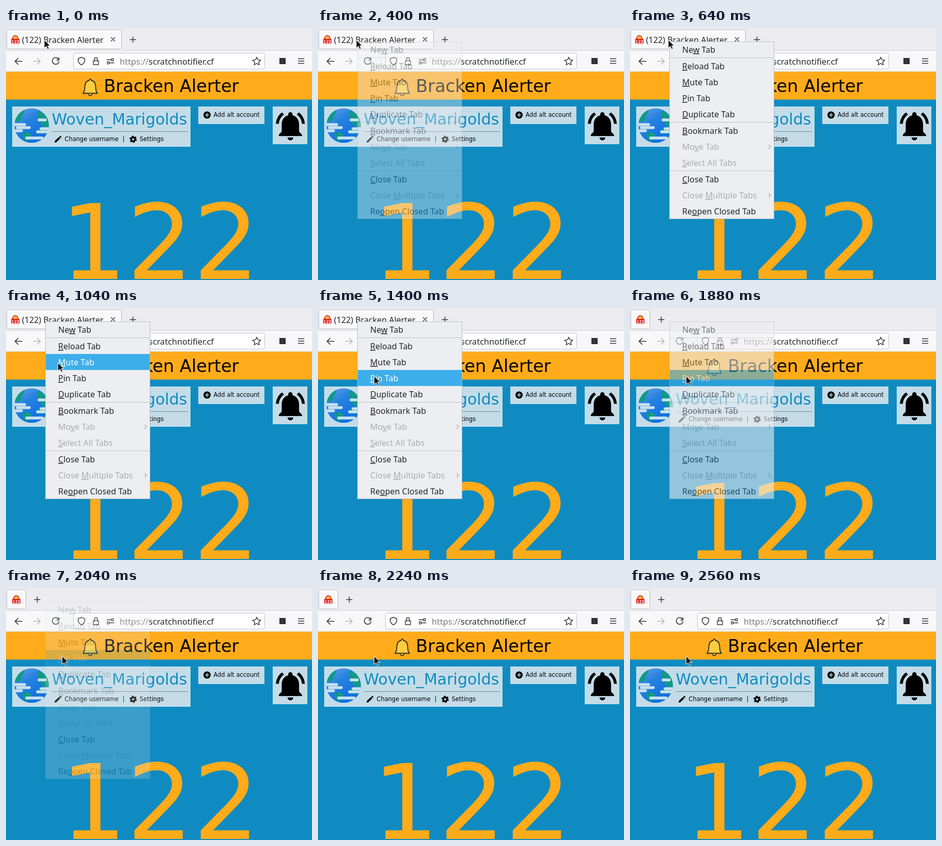
An HTML page for the animation above (2.92 s loop, 592 by 488 pixels).

```html
<!DOCTYPE html>
<html lang="en">
<head>
<meta charset="utf-8">
<title>Pin Tab</title>
<style>
  html, body { margin: 0; width: 100%; height: 100%; overflow: hidden; }
  svg { display: block; }
  text { white-space: pre; }
  .ui { font: 16px "Noto Sans", sans-serif; fill: #232629; }
  .page { font-family: "DejaVu Sans", sans-serif; }
  .small { font-size: 11.4px; }
  .line { fill: none; stroke: #33333a; stroke-width: 1.4; stroke-linecap: round; stroke-linejoin: round; }
  .panel { fill: #c3dce8; }
  .key { text-decoration: underline; }
  .off { fill: #a9abae; }
  .hover rect { fill: #3daee9; }
  .hover text { fill: #fcfcfc; }
</style>
</head>
<body>
<svg width="592" height="488" viewBox="0 0 592 488">
  <defs>
    <clipPath id="disc"><circle cx="49.5" cy="189" r="33.5"/></clipPath>
    <linearGradient id="sea" x2=".6" y2="1">
      <stop stop-color="#5c9fe4"/><stop offset=".45" stop-color="#2580e0"/><stop offset="1" stop-color="#0c6fe0"/>
    </linearGradient>
    <g id="icon">
      <path d="M2 8C3 6 3 1 8 .7 13 1 13 6 14 8Z" fill="#fbc531" stroke="#d01818" stroke-width="1.6"/>
      <rect y="7.5" width="16" height="8.5" rx="1" fill="#e01515"/>
      <text x="8" y="14.7" text-anchor="middle" font-family="DejaVu Sans, sans-serif" font-size="7.5" font-weight="bold" fill="#fff">122</text>
    </g>
  </defs>

  <!-- browser -->
  <rect width="592" height="44" fill="#ededf1"/>
  <rect y="43" width="592" height="42" fill="#f8f8fa"/>
  <path d="M0 43.5H592M0 84.5H592" stroke="#cfcfd5"/>
  <rect id="tab" x="1.5" y="3.5" height="37" rx="4" fill="#f9f9fb" stroke="#b9b9c0"/>
  <use id="favicon" href="#icon" y="14"/>
  <g id="tabLabel">
    <text class="ui" x="31" y="29">(122) Bracken Alerter</text>
    <path class="line" d="M203.5 18.5l7 7m0-7l-7 7"/>
  </g>
  <path id="plus" class="line" d="M-5.5 22.5H5.5M0 17V28"/>

  <g class="line">
    <path d="M31 64.5H18M23.5 58.5L17.5 64.5 23.5 70.5" stroke-width="1.6"/>
    <path d="M53 64.5H66M60.500 58.5L66.5 64.5 60.5 70.5" stroke="#b4b4ba"/>
    <path d="M102 61A6.5 6.5 0 1 0 102.5 65M102.5 57.5V62H98" stroke-width="1.6"/>
    <rect x="130.5" y="48.5" width="370" height="31" rx="3" style="fill:#fff;stroke:#c0c0c7;stroke-width:1"/>
    <path d="M146 57L152.5 59.5C153 66 150 69.5 146 71.5 142 69.5 139 66 139.5 59.5Z"/>
    <path d="M169 63.5H179V71H169ZM171 63V60.5a3 3 0 0 1 6 0V63"/>
    <path d="M195 61.5H203M201 67.5H209"/>
    <circle cx="206" cy="61.5" r="2.2"/><circle cx="198" cy="67.5" r="2.2"/>
    <path d="M485 56.5L487.3 61.6 493 62.2 488.8 66 490 71.5 485 68.7 480 71.5 481.2 66 477 62.2 482.7 61.6Z"/>
    <path d="M565.5 59.5H576.5M565.5 64H576.5M565.5 68.5H576.5"/>
  </g>
  <rect x="529" y="58" width="12" height="12" fill="#33333a"/>
  <text class="ui" x="220" y="70.5" style="font-size:16.3px"><tspan fill="#7c7c82">https://</tspan>scratchnotifier.cf</text>

  <!-- page -->
  <g class="page">
    <rect y="138" width="592" height="350" fill="#0f8bc1"/>
    <rect y="84.6" width="592" height="54" fill="#ffab1a"/>
    <path d="M149 126.5C152 123 152.5 120 152.5 114 152.5 107 156 102.5 161 101.5 160.5 98 165.5 98 165 101.5 170 102.5 173.5 107 173.5 114 173.5 120 174 123 177 126.5Z" fill="#ffcb3f" stroke="#302a20" stroke-width="1.8" stroke-linejoin="round"/>
    <path d="M159.5 127.5a3.5 3.2 0 0 0 7 0" fill="#ffcb3f" stroke="#302a20" stroke-width="1.8"/>
    <text x="189.3" y="124" font-size="33.6">Bracken Alerter</text>

    <rect class="panel" x="12" y="152" width="345" height="78"/>
    <g clip-path="url(#disc)">
      <circle cx="49.5" cy="189" r="33.5" fill="url(#sea)"/>
      <path d="M16 182C20 168 28 160 36 158L34 166 30 172 28 180ZM60 160C70 162 79 170 84 181L82 194 73 191 66 184 62 176ZM30 205L44 201 50 209 46 219 36 217ZM60 196H74L70 206 60 204Z" fill="#119a86"/>
      <path d="M17 187H36M22 193H45M17 199H30M61 201H84M68 195H84M40 213H70M64 178H76" stroke="#c9e2ee" stroke-width="5.5" stroke-linecap="round"/>
    </g>
    <text x="88.5" y="187" font-size="30">
      <tspan fill="#0f8bc1" x="88.5">Woven_Marigolds</tspan></text>
    <path d="M88 200.5H353" stroke="#75878f"/>
    <path transform="translate(92 206.5) scale(.73)" d="M3 17.25V21h3.75L17.81 9.94l-3.75-3.75zM20.71 7.04a1 1 0 0 0 0-1.41l-2.34-2.34a1 1 0 0 0-1.41 0l-1.83 1.83 3.75 3.75z"/>
    <g fill="none" stroke="#000">
      <circle cx="246" cy="215.5" r="3.8" stroke-width="3.4"/>
      <circle cx="246" cy="215.5" r="6" stroke-width="2.2" stroke-dasharray="3.142"/>
    </g>
    <g class="small">
      <text x="113.5" y="219">Change username</text>
      <text x="225.5" y="219">|</text>
      <text x="258.5" y="219">Settings</text>
      <rect class="panel" x="372" y="152" width="128" height="34"/>
      <text x="401.5" y="172">Add alt account</text>
    </g>
    <circle cx="389" cy="168.5" r="7"/>
    <path d="M385 168.5H393M389 164.5V172.5" stroke="#c3dce8" stroke-width="1.6"/>

    <rect class="panel" x="516" y="152" width="67" height="73"/>
    <path transform="translate(516.6 156) scale(2.8)" d="M7.58 4.08L6.15 2.65C3.75 4.48 2.17 7.3 2.03 10.5h2c.15-2.65 1.51-4.97 3.55-6.42zM19.97 10.5h2c-.15-3.2-1.73-6.02-4.12-7.85l-1.42 1.43c2.02 1.45 3.39 3.77 3.54 6.42zM18 11c0-3.07-1.64-5.64-4.5-6.32V4a1.5 1.5 0 0 0-3 0v.68C7.63 5.36 6 7.92 6 11v5l-2 2v1h16v-1l-2-2zM10 20a2 2 0 0 0 4 0z"/>
    <text x="105.5" y="486" font-size="201.6" fill="#ffab1a">122</text>
  </g>

  <g id="menu">
    <rect x="76.5" y="26.5" width="202" height="343" fill="#edeef1" stroke="#bbbdc1"/>
    <g id="items"></g>
    <path d="M77 57.5H278M77 182.5H278M77 276.5H278" stroke="#bfc1c5"/>
    <path d="M268 226l4 4-4 4M268 320l4 4-4 4" fill="none" stroke="#a9abae" stroke-width="1.3"/>
  </g>
  <path id="cursor" d="M0 0V16L4 12.5 6.6 18.3 9.3 17.1 6.7 11.5H11.5Z" fill="#111" stroke="#fff"/>
</svg>

<script>
const LOOP = 2920, CLICK = 1720;
const $ = id => document.getElementById(id);
const progress = (t, from, to) => Math.min(1, Math.max(0, (t - from) / (to - from)));
const easeInOut = p => p * p * (3 - 2 * p);

// [top of row, label with "&" before its access key, disabled]
const rows = [
  [26, 'Ne&w Tab'], [58, '&Reload Tab'], [89, '&Mute Tab'], [120, '&Pin Tab'],
  [151, '&Duplicate Tab'], [183, '&Bookmark Tab'], [214, 'Mo&ve Tab', true],
  [245, '&Select All Tabs', true], [277, '&Close Tab'],
  [308, 'Close &Multiple Tabs', true], [339, 'Re&open Closed Tab']
];
$('items').innerHTML = rows.map(([top, label, off]) => `<g>
  <rect x="77" y="${top}" width="201" height="31" fill="none"/>
  <text class="ui" x="101" y="${top + 22}"><tspan class="${off ? 'off' : ''}">${
    label.replace(/&(.)/, '<tspan class="key">$1</tspan>')}</tspan></text></g>`).join('');
const items = [...$('items').children];

function draw(now) {
  const t = now % LOOP;
  const pinned = t >= CLICK;
  $('tab').setAttribute('width', pinned ? 37 : 222);
  $('favicon').setAttribute('x', pinned ? 12 : 10);
  $('tabLabel').style.display = pinned ? 'none' : '';
  $('plus').setAttribute('transform', `translate(${pinned ? 60.5 : 245.5} 0)`);

  const move = easeInOut(progress(t, 700, 1200));
  const x = 74 + 34.5 * move, y = 23 + 109 * move;
  $('cursor').setAttribute('transform', `translate(${x} ${y})`);
  items.forEach((item, i) => {
    const top = rows[i][0];
    item.classList.toggle('hover', x > 77 && y >= top && y < top + 31);
  });

  $('menu').style.opacity = pinned ? 1 - progress(t, CLICK, 2120) : progress(t, 270, 610);
  requestAnimationFrame(() => draw(performance.now()));
}
draw(performance.now());
</script>
</body>
</html>
```
